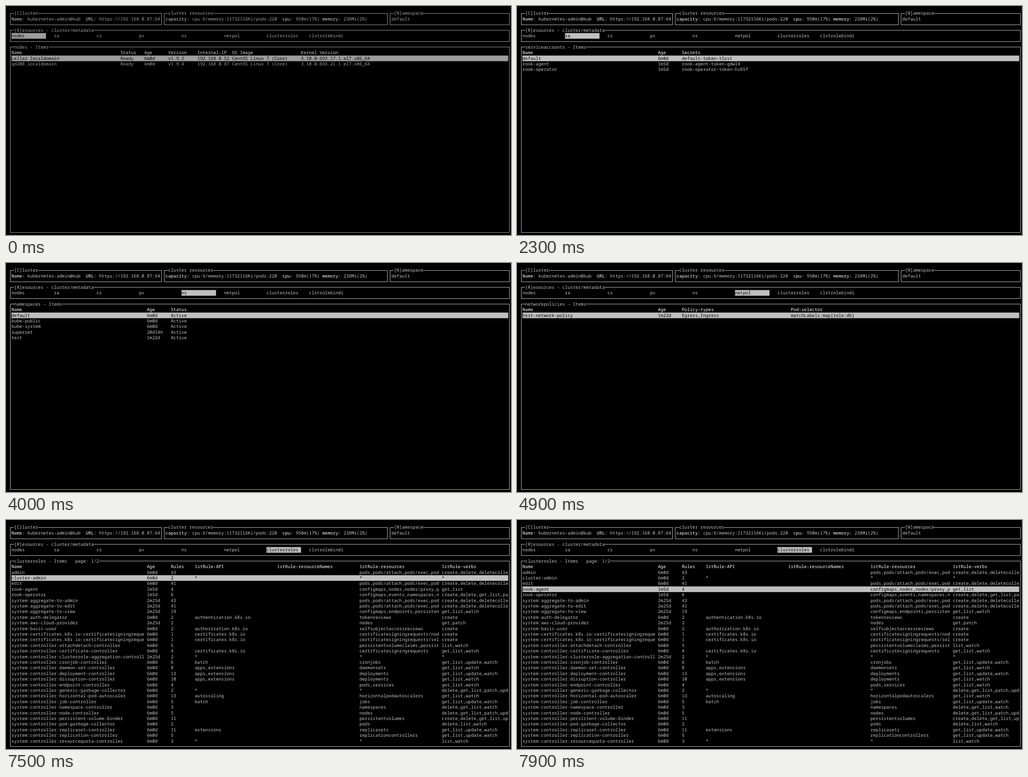
These frames come from a looping animation (1109x505 px, 8000 ms). An HTML page:

```html
<!DOCTYPE html>
<html lang="en">
<head>
<meta charset="utf-8">
<title>Cluster browser</title>
<style>
html, body { margin: 0; width: 100%; height: 100%; overflow: hidden; background: #000; }
svg { display: block; width: 1109px; height: 505px; }
text {
  font: 9.722px "Noto Sans Mono", "DejaVu Sans Mono", monospace;
  font-variant-ligatures: none;
  text-rendering: geometricPrecision;
  white-space: pre;
  fill: #c4c4c4;
}
.head { fill: #fff; }
.picked { fill: #000; }
.bar { fill: #c0c0c0; }
.line { fill: none; stroke: #c0c0c0; shape-rendering: crispEdges; }
.edge { fill: #303030; }
</style>
</head>
<body>
<svg viewBox="0 0 1109 505"><g id="stage"></g></svg>
<script>
const LOOP = 8000, CELL = 35 / 6, ROW = 12.4, FIRST_ROW = 9;
const TABS = ['nodes', 'sa', 'cs', 'pv', 'ns', 'netpol', 'clusterroles', 'clstrolebindi'];

// Each screen: title, column offsets, then a header line and item lines.
const SCREENS = {
  nodes: ['nodes - Items', [0, 41, 50, 59, 70, 83, 109], `
Name|Status|Age|Version|Internal-IP|OS Image|Kernel Version
cellar.localdomain|Ready|6m0d|v1.9.2|192.168.0.52|CentOS Linux 7 (Core)|3.10.0-693.17.1.el7.x86_64
qd208.localdomain|Ready|6m0d|v1.9.4|192.168.0.87|CentOS Linux 7 (Core)|3.10.0-693.21.1.el7.x86_64`],
  sa: ['serviceaccounts - Items', [0, 51, 60], `
Name|Age|Secrets
default|6m0d|default-token-t5zst
rook-agent|1m5d|rook-agent-token-gdwl4
rook-operator|1m5d|rook-operator-token-hz65f`],
  cs: ['componentstatuses - Items', [0, 51, 65], `
Name|Healthy|Message
controller-manager|True|ok
etcd-0|True|{"health": "true"}
scheduler|True|ok`],
  pv: ['persistentvolumes - Items', [0, 36, 49, 70, 86, 95, 126], `
Name|Capacity|Accessmodes|Reclaimpolicy|Status|Claim|Age
nfs|30Gi|ReadWriteMany|Retain|Bound|default/postgres-pvc|1m18d
superset-pv-volume|10Gi|ReadWriteOnce|Retain|Bound|superset/superset-pv-claim|20d14h`],
  ns: ['namespaces - Items', [0, 51, 60], `
Name|Age|Status
default|6m0d|Active
kube-public|6m0d|Active
kube-system|6m0d|Active
superset|20d14h|Active
test|1m22d|Active`],
  netpol: ['networkpolicies - Items', [0, 51, 60, 101], `
Name|Age|Policy-types|Pod-selector
test-network-policy|1m22d|Egress,Ingress|matchLabels:map[role:db]`],
  clusterroles: ['clusterroles - Items   page: 1/2', [0, 51, 60, 69, 100, 131, 162], `
Name|Age|Rules|1stRule-API|1stRule-resourceNames|1stRule-resources|1stRule-verbs
admin|6m0d|43|||pods,pods/attach,pods/exec,pod|create,delete,deletecolle
cluster-admin|6m0d|2|*||*|*
edit|6m0d|41|||pods,pods/attach,pods/exec,pod|create,delete,deletecolle
rook-agent|1m5d|4|||configmaps,nodes,nodes/proxy,p|get,list
rook-operator|1m5d|6|||configmaps,events,namespaces,n|create,delete,get,list,pa
system:aggregate-to-admin|2m25d|43|||pods,pods/attach,pods/exec,pod|create,delete,deletecolle
system:aggregate-to-edit|2m25d|41|||pods,pods/attach,pods/exec,pod|create,delete,deletecolle
system:aggregate-to-view|2m25d|19|||configmaps,endpoints,persisten|get,list,watch
system:auth-delegator|6m0d|2|authentication.k8s.io||tokenreviews|create
system:aws-cloud-provider|2m25d|2|||nodes|get,patch
system:basic-user|6m0d|2|authorization.k8s.io||selfsubjectaccessreviews|create
system:certificates.k8s.io:certificatesigningreque|6m0d|1|certificates.k8s.io||certificatesigningrequests/nod|create
system:certificates.k8s.io:certificatesigningreque|6m0d|1|certificates.k8s.io||certificatesigningrequests/sel|create
system:controller:attachdetach-controller|6m0d|5|||persistentvolumeclaims,persist|list,watch
system:controller:certificate-controller|6m0d|4|certificates.k8s.io||certificatesigningrequests|get,list,watch
system:controller:clusterrole-aggregation-controll|2m25d|2|*||*|*
system:controller:cronjob-controller|6m0d|6|batch||cronjobs|get,list,update,watch
system:controller:daemon-set-controller|6m0d|8|apps,extensions||daemonsets|get,list,watch
system:controller:deployment-controller|6m0d|13|apps,extensions||deployments|get,list,update,watch
system:controller:disruption-controller|6m0d|10|apps,extensions||deployments|get,list,watch
system:controller:endpoint-controller|6m0d|4|||pods,services|get,list,watch
system:controller:generic-garbage-collector|6m0d|2|*||*|delete,get,list,patch,upd
system:controller:horizontal-pod-autoscaler|6m0d|13|autoscaling||horizontalpodautoscalers|get,list,watch
system:controller:job-controller|6m0d|5|batch||jobs|get,list,update,watch
system:controller:namespace-controller|6m0d|3|||namespaces|delete,get,list,watch
system:controller:node-controller|6m0d|5|||nodes|delete,get,list,patch,upd
system:controller:persistent-volume-binder|6m0d|11|||persistentvolumes|create,delete,get,list,up
system:controller:pod-garbage-collector|6m0d|2|||pods|delete,list,watch
system:controller:replicaset-controller|6m0d|11|extensions||replicasets|get,list,update,watch
system:controller:replication-controller|6m0d|5|||replicationcontrollers|get,list,update,watch
system:controller:resourcequota-controller|6m0d|3|*||*|list,watch`]
};

// Start time, screen, selected item, brightness.
const STEPS = [
  [0, 'nodes', 0, 0.82],
  [700, 'nodes', 0, 1],
  [2300, 'sa', 0, 1],
  [3100, 'cs', 0, 1],
  [3200, 'pv', 0, 1],
  [4000, 'ns', 0, 1],
  [4900, 'netpol', 0, 1],
  [5700, 'clusterroles', 0, 1],
  [7500, 'clusterroles', 1, 1],
  [7700, 'clusterroles', 2, 1],
  [7900, 'clusterroles', 3, 1]
];

const colX = col => 12 + col * CELL;
const rowY = row => 3.9 + row * ROW;
const pixel = v => Math.floor(v) + 0.5;

const label = (col, row, str, cls = '') =>
  `<text class="${cls}" x="${colX(col).toFixed(2)}" y="${(rowY(row) + 3.1).toFixed(2)}">${str}</text>`;

const bar = (col, row, cols) =>
  `<rect class="bar" x="${colX(col)}" y="${rowY(row) - ROW / 2}" width="${cols * CELL}" height="${ROW}"/>`;

// A frame through cell centres, with a gap in its top line for the title.
function box(left, top, right, bottom, title, titleCol) {
  const [x1, x2] = [left, right].map(c => pixel(colX(c + 0.5)));
  const [y1, y2] = [top, bottom].map(r => pixel(rowY(r)));
  const gapEnd = colX(titleCol + title.length);
  return `<path class="line" d="M${colX(titleCol)} ${y1}H${x1}V${y2}H${x2}V${y1}H${gapEnd}"/>` +
    label(titleCol, top, title);
}

const FIXED = [
  '<rect class="edge" x="1108" width="1" height="505"/>',
  box(-1, 1, 56, 3, '[C]luster', 1),
  box(57, 1, 141, 3, 'cluster resources', 59),
  box(142, 1, 187, 3, '[N]amespace', 144),
  box(-1, 4, 187, 6, '[R]esources - cluster/metadata', 1),
  label(0, 2, 'Name:', 'head'), label(6, 2, 'kubernetes-admin@kub'),
  label(28, 2, 'URL:', 'head'), label(33, 2, 'https://192.168.0.87:64'),
  label(58, 2, 'capacity:', 'head'), label(68, 2, 'cpu:6/memory:11732116Ki/pods:220'),
  label(102, 2, 'cpu:', 'head'), label(107, 2, '950m(17%)'),
  label(117, 2, 'memory:', 'head'), label(125, 2, '238Mi(2%)'),
  label(143, 2, 'default')
].join('');

function draw(name, selected) {
  const [title, cols, data] = SCREENS[name];
  const tab = TABS.indexOf(name);
  let out = FIXED + bar(tab * 16, 5, 13) + box(-1, 7, 187, 40, title, 1) +
    bar(0, FIRST_ROW + selected, 187);
  TABS.forEach((t, i) => { out += label(i * 16, 5, t, i === tab ? 'picked' : ''); });
  data.trim().split('\n').forEach((line, i) => {
    const cls = i === 0 ? 'head' : i - 1 === selected ? 'picked' : '';
    line.split('|').forEach((str, c) => {
      if (str) out += label(cols[c], FIRST_ROW - 1 + i, str, cls);
    });
  });
  return out;
}

const stage = document.getElementById('stage');
const start = performance.now();
let shown = null;

function tick() {
  const t = (performance.now() - start) % LOOP;
  const step = STEPS.findLast(s => s[0] <= t);
  if (step !== shown) {
    shown = step;
    stage.innerHTML = draw(step[1], step[2]);
    stage.setAttribute('opacity', step[3]);
  }
  requestAnimationFrame(tick);
}
tick();
</script>
</body>
</html>
```
